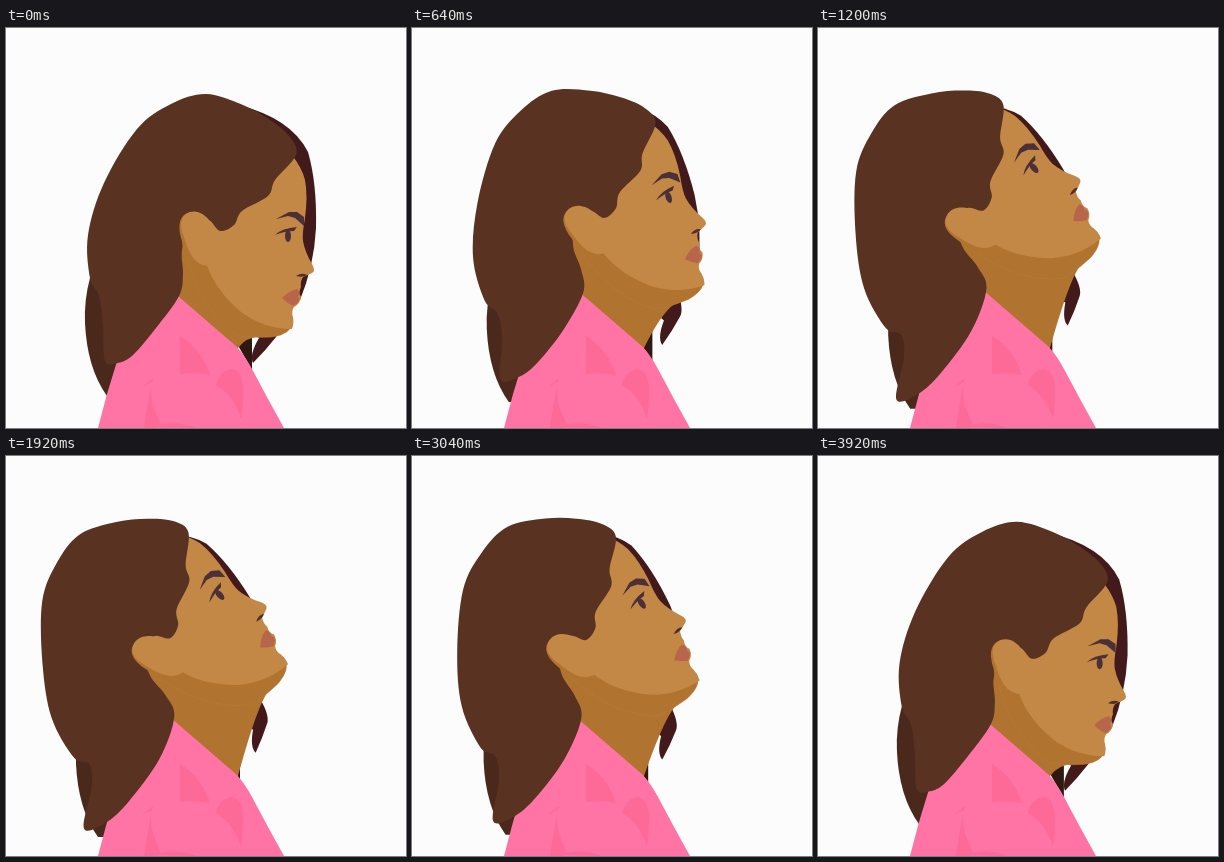
An HTML page for the animation above (4000 ms loop, 400x400 px).

```html
<!DOCTYPE html>
<html lang="en">
<head>
<meta charset="utf-8">
<title>Looking up</title>
<style>
  html, body { margin: 0; width: 100%; height: 100%; overflow: hidden; background: #fcfcfc; }
  svg { display: block; width: 100vw; height: 100vh; }
</style>
</head>
<body>
<svg viewBox="0 0 400 400">
  <g fill="#431a1b">
    <path id="farHair" d="M232 77Q285 90 302 124Q311 155 310 200Q308 238 294 272L232 280L200 120Z"/>
    <path id="farLock" d="M232 285L272 280Q276 302 270 309Q260 322 247 335Q243 327 253 310Z"/>
  </g>
  <path id="nape" fill="#2f180f" d="M230 314L246 304V342Z"/>
  <path id="backHair" fill="#4a281c" d="M110 240L84 250Q78 272 79 295Q81 340 101 368H120Z"/>
  <path id="neck" fill="#b07430"/>
  <path fill="#ff74a5" d="M92 400L101 366L112 330L158 256L231 319Q239 328 246 341L262 371L278 400Z"/>
  <g fill="#fd6a98">
    <path d="M174 308Q196 322 204 347Q190 344 174 346Z"/>
    <path d="M136 359L147 350Q143 362 147 378L155 398L150 400H138Q141 378 146 354Z"/>
    <path d="M210 357Q214 342 226 341Q236 343 237 360Q237 378 235 391Q228 367 210 357Z"/>
    <path d="M146 399Q168 391 190 400Z"/>
  </g>
  <g class="head">
    <path fill="#b07430" stroke="#b87a37" stroke-width=".6"
      d="M178 215Q184 252 202 278Q216 297 231 307Q240 310 266 309Q286 306 287 293L255 260Z"/>
    <path fill="#c48846" d="M286 127Q296 140 299 152Q302 168 299 190Q296 206 297 213Q299 224 306 236
      Q310 243 306 245L297 249Q294 254 295 259Q292 265 295 269Q294 276 288 279
      Q285 284 287 289Q288 296 286 301Q258 301 235 284Q209 262 201 237L188 205L215 120Z"/>
  </g>
  <path id="hair" fill="#5a3221"/>
  <g class="head">
    <path fill="#b07430" d="M186 184C171 186 172 200 176 213C177 226 184 237 199 238Z"/>
    <path fill="#c48846" d="M206 196C199 185 191 182 184 184C173 188 174 199 178 209C182 223 188 238 203 238L216 214Z"/>
    <path fill="#b8664b" d="M276 270Q284 262 291 261Q295 264 292 269Q296 273 287 278Q281 275 276 270Z"/>
    <path fill="#50302c" d="M290 248Q296 244 301 247Q297 250 290 248Z"/>
    <g id="eye" fill="#4b3037">
      <path d="M270 191L283 184L291 184L298 189V198L289 190L282 188Z"/>
      <path d="M269 207Q276 200 291 199L288 203Q279 203 269 207Z"/>
      <ellipse cx="282" cy="208" rx="3" ry="6"/>
    </g>
  </g>
</svg>
<script>
const PX = 160, PY = 260;  // base of the skull, the point the head turns on
const TILT = 41, LOOP = 4000, STEP = 80;

// Outline of the near hair with the head level.
const hairline = [
  [237,77], [264,92], [284,109], [290,127], [269,152], [262,168], [236,183], [228,197], [214,203],
  [202,192], [185,200], [176,222], [177,246], [173,268], [150,300], [127,327], [112,335], [99,333],
  [97,298], [93,268], [84,250], [82,207], [98,155], [131,101], [165,76], [200,66]
];

const byId = id => document.getElementById(id);
const heads = document.querySelectorAll(".head");
const clamp01 = v => Math.min(1, Math.max(0, v));
const smoothstep = (a, b, v) => { const u = clamp01((v - a) / (b - a)); return u * u * (3 - 2 * u); };
const fmt = (...v) => v.map(n => n.toFixed(2)).join(" ");

function turn([x, y], degrees, scale = 1) {
  const dx = x - PX, dy = y - PY, a = Math.atan2(dy, dx) - degrees * Math.PI / 180;
  const r = Math.hypot(dx, dy) * scale;
  return [PX + r * Math.cos(a), PY + r * Math.sin(a)];
}

// Hair follows the head less towards its tips, and its back slides down and out.
function drape([x, y], k) {
  const follow = 0.86 - 0.71 * smoothstep(235, 335, y);
  const stretch = Math.max(0, PX - x) * (4e-4 + 1.2e-7 * (y - 100) ** 2);
  const [hx, hy] = turn([x, y], TILT * follow * k, 1 + stretch * k);
  return [hx - 7 * k, hy];
}

// Closed Catmull-Rom curve.
function smooth(pts) {
  const n = pts.length, at = i => pts[(i + n) % n];
  let d = "M" + fmt(...pts[0]);
  for (let i = 0; i < n; i++) {
    const [a, b, c, e] = [at(i - 1), at(i), at(i + 1), at(i + 2)];
    d += "C" + fmt(b[0] + (c[0] - a[0]) / 6, b[1] + (c[1] - a[1]) / 6,
      c[0] - (e[0] - b[0]) / 6, c[1] - (e[1] - b[1]) / 6, c[0], c[1]);
  }
  return d + "Z";
}

// The neck stands on the collar; its upper points go with the head.
function neckPath(k) {
  const [ear, chin, throat] = [[170, 200], [256, 308], [240, 309]].map(p => fmt(...turn(p, TILT * k)));
  return `M160 275L${ear}L${chin}Q${throat} 232 320L222 332Z`;
}

const ease = u => (1 - Math.cos(Math.PI * u)) / 2;

// A third of the loop each: rise, hold, return.
function lift(t) {
  const u = t / LOOP * 3;
  return u < 1 ? ease(u) : u < 2 ? 1 : ease(3 - u);
}

function move(el, { angle = 0, scale = 1, x = 0, y = 0 }) {
  el.setAttribute("transform",
    `translate(${PX + x} ${PY + y}) rotate(${-angle}) scale(${scale}) translate(${-PX} ${-PY})`);
}

function draw(t) {
  const k = lift(t);
  for (const g of heads) move(g, { angle: TILT * k });
  move(byId("eye"), { x: -2 * k, y: -4 * k });
  move(byId("farHair"), { angle: 33 * k, scale: 1 - 0.1 * k });
  move(byId("farLock"), { angle: 20 * k, scale: 1 - 0.1 * k, x: -7 * k });
  move(byId("nape"), { x: -12 * k, y: -8 * k });
  move(byId("backHair"), { x: -9 * k, y: 13 * k });
  byId("neck").setAttribute("d", neckPath(k));
  byId("hair").setAttribute("d", smooth(hairline.map(p => drape(p, k))));
}

const start = performance.now();
function tick() {
  const t = (performance.now() - start) % LOOP;
  draw(Math.floor(t / STEP) * STEP);
  requestAnimationFrame(tick);
}
tick();
</script>
</body>
</html>
```
